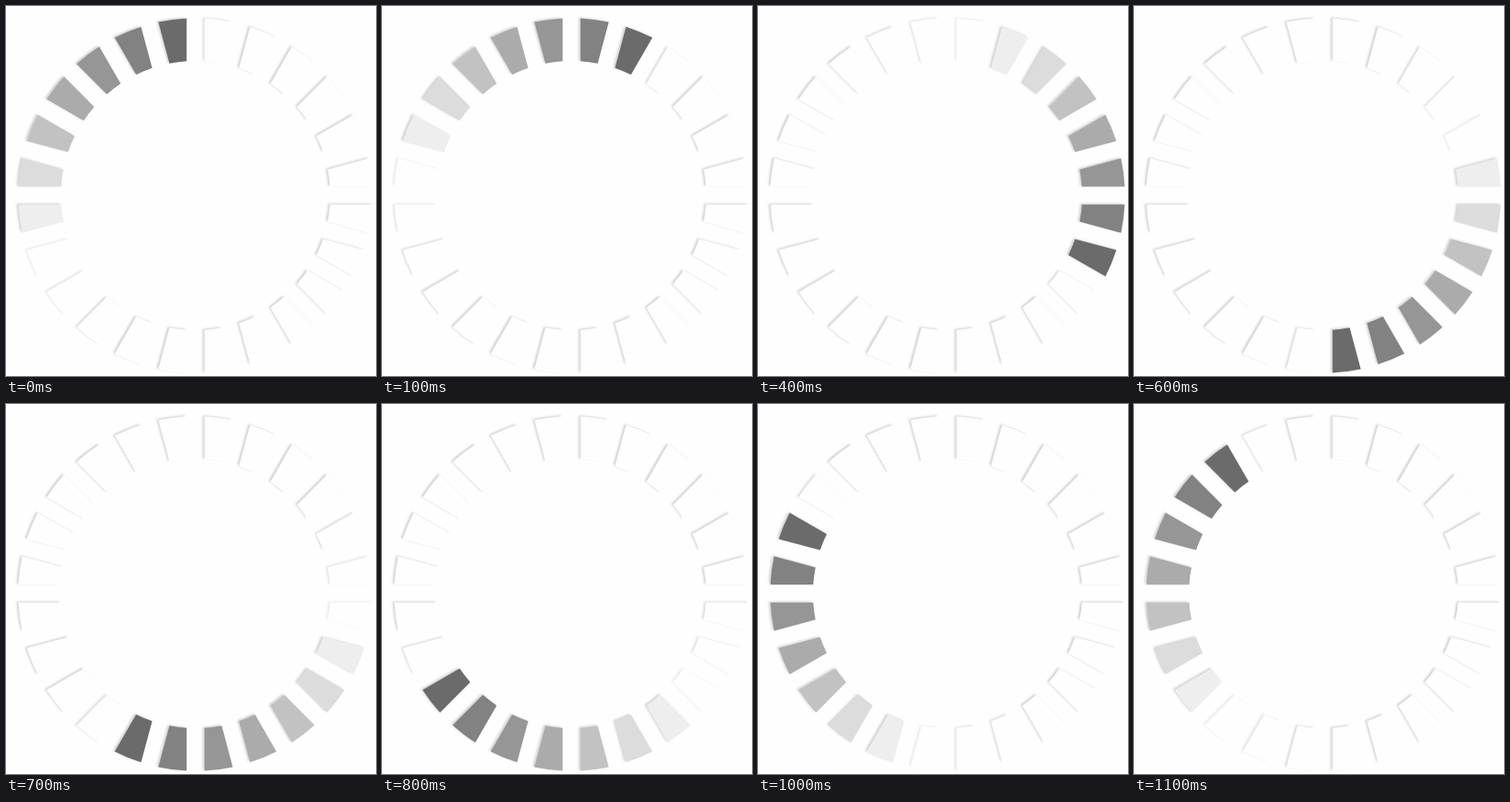
These frames come from a looping animation (404 px wide and 404 px high, 1.2 s). An HTML page:

```html
<!DOCTYPE html>
<html lang="en">
<head>
<meta charset="utf-8">
<title>Loading ring</title>
<style>
  html, body { margin: 0; width: 100%; height: 100%; overflow: hidden; background: #fefefe; }
  svg { display: block; width: 404px; height: 404px; }
  path {
    fill: #fefefe;
    filter: drop-shadow(-1.2px -.7px .8px rgba(0, 0, 0, .17));
    animation: lead 1.2s step-end infinite;
  }
  .follow { animation-name: follow; }

  /* The head advances two blocks per 100 ms, so neighbours take alternate shades. */
  @keyframes lead {
    0% { fill: #6b6b6b; }
    8.33% { fill: #969696; }
    16.66% { fill: #c2c2c2; }
    24.99% { fill: #eee; }
    33.33% { fill: #fefefe; opacity: .6; }
    41.66%, 100% { fill: #fefefe; opacity: 1; }
  }
  @keyframes follow {
    0% { fill: #828282; }
    8.33% { fill: #ababab; }
    16.66% { fill: #dcdcdc; }
    24.99% { fill: #fefefe; opacity: .45; }
    33.33% { fill: #fefefe; opacity: .8; }
    41.66% { fill: #fefefe; opacity: 1; }
    91.66%, 100% { fill: #fefefe; opacity: .75; }
  }
</style>
</head>
<body>
<svg viewBox="0 0 404 404"></svg>
<script>
  const svg = document.querySelector('svg');
  const count = 24, center = 207, outer = 193.7, inner = 147, halfGap = 9.75;
  const sector = 2 * Math.PI / count;

  const point = (radius, angle) =>
    (center + radius * Math.sin(angle)).toFixed(2) + ' ' +
    (center - radius * Math.cos(angle)).toFixed(2);

  // A ring sector whose sides are moved inwards, leaving parallel gaps.
  function block(index) {
    const start = index * sector, end = start + sector;
    const outerInset = Math.asin(halfGap / outer);
    const innerInset = Math.asin(halfGap / inner);
    return `M${point(outer, start + outerInset)}` +
      `A${outer} ${outer} 0 0 1 ${point(outer, end - outerInset)}` +
      `L${point(inner, end - innerInset)}` +
      `A${inner} ${inner} 0 0 0 ${point(inner, start + innerInset)}Z`;
  }

  for (let i = 0; i < count; i++) {
    const path = document.createElementNS('http://www.w3.org/2000/svg', 'path');
    path.setAttribute('d', block(i));
    if (i % 2 === 0) path.setAttribute('class', 'follow');
    path.style.animationDelay = (Math.floor(i / 2) - 11) * 100 + 'ms';
    svg.append(path);
  }
</script>
</body>
</html>
```
